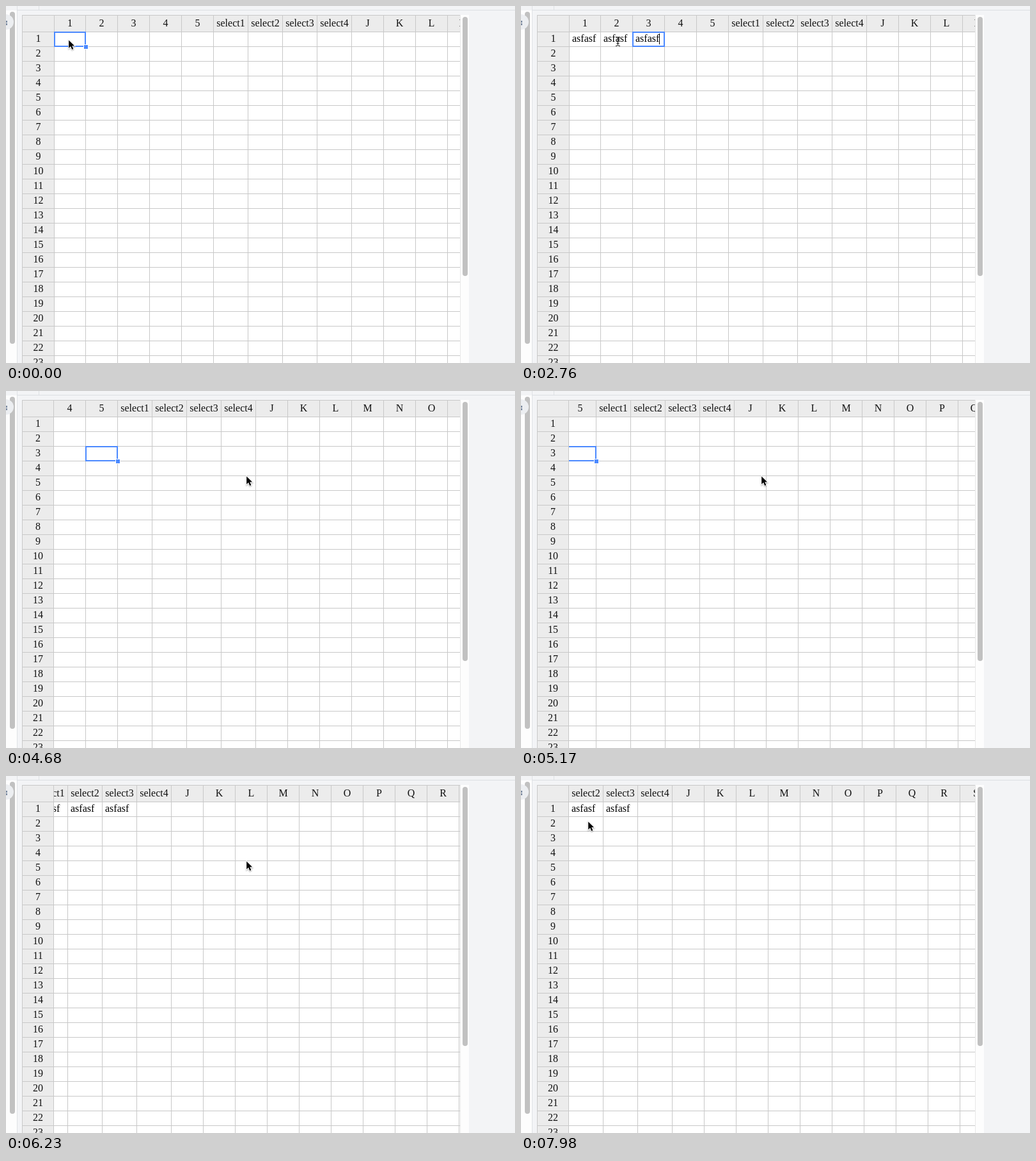
Write an HTML page with a canvas that moves like this. It is 796x558 px and loops after 8 s.

```html
<!DOCTYPE html>
<html lang="en">
<head>
<meta charset="utf-8">
<title>Spreadsheet</title>
<style>
  html, body { margin: 0; width: 100%; height: 100%; overflow: hidden; }
  canvas { display: block; }
</style>
</head>
<body>
<canvas id="stage" width="796" height="558"></canvas>
<script>
const ctx = document.getElementById('stage').getContext('2d');
const LOOP = 8000, WIDTH = 796, HEIGHT = 558;
const LEFT = 25, TOP = 14, HEAD_BOTTOM = 40, HEAD_RIGHT = 74, RIGHT = 710, ROW = 23;
const LINE = '#c8c8c8', HEAD = '#ececec', BLUE = '#4b89ff', PAGE = '#f3f4f6';
const TRACK = '#fdfdfd', THUMB = '#c1c1c1';
const WORD = 'asfasf', CARET_OFF = 2880;

const labels = [...'12345', 'select1', 'select2', 'select3', 'select4', ...'JKLMNOPQRSTU'];
let edge = HEAD_RIGHT + 1;
const columns = labels.map((label, i) => {
  const left = edge;
  edge += label.length > 1 ? 54 : i ? 50 : 49;
  return { label, left, right: edge };
});

const smooth = p => p * p * p * (10 - 15 * p + 6 * p * p);
const lateRush = p => p ** 4.4;

// Each move advances in `steps` jumps, one per `every` ms, to the given values.
const moves = [
  { start: 2760, steps: 1, every: 60, to: { x: 150 } },
  { start: 2820, steps: 2, every: 60, to: { x: 312, y: 94 } },
  { start: 3360, steps: 3, every: 60, to: { x: 376, y: 132 } },
  { start: 3950, steps: 13, every: 61, to: { scroll: 150 } },
  { start: 4830, steps: 14, every: 58, to: { scroll: 264 } },
  { start: 5650, steps: 12, every: 65, to: { scroll: 304 }, ease: lateRush },
  { start: 6850, steps: 7, every: 60, to: { x: 58, y: 46 } },
  { start: 7275, steps: 7, every: 60, to: { x: 195, y: 42 } },
  { start: 7690, steps: 6, every: 58, to: { x: 105, y: 70 } },
];

const edits = [
  { column: 0, start: 240, pace: 80, commit: 870 },
  { column: 1, start: 1170, pace: 70, commit: 1760 },
  { column: 2, start: 2060, pace: 70, commit: 3120 },
];

function stateAt(t) {
  const state = { x: 98, y: 52, scroll: 0 };
  for (const { start, steps, every, to, ease = smooth } of moves) {
    if (t < start) break;
    const step = 1 + Math.floor((t - start + 12) / every);
    const progress = ease(Math.min(1, step / steps));
    for (const key in to) state[key] = Math.round(state[key] + (to[key] - state[key]) * progress);
  }
  return state;
}

function rect(x, y, w, h, color) {
  ctx.fillStyle = color;
  ctx.fillRect(x, y, w, h);
}

function pill(x, y, w, h, color) {
  ctx.fillStyle = color;
  ctx.beginPath();
  ctx.roundRect(x, y, w, h, w / 2);
  ctx.fill();
}

function text(value, x, baseline, align = 'center', color = '#111') {
  ctx.textAlign = align;
  ctx.fillStyle = color;
  ctx.fillText(value, x, baseline);
}

function clip(x) {
  ctx.beginPath();
  ctx.rect(x, TOP, RIGHT - x, HEIGHT);
  ctx.clip();
}

function drawPage() {
  rect(0, 0, WIDTH, HEIGHT, PAGE);
  rect(0, 7, 17, HEIGHT, TRACK);
  rect(17, 0, 1, HEIGHT, '#dfe1e5');
  rect(18, 6, WIDTH, 1, '#dcdfe3');
  rect(51, 0, 1, 6, '#dfe1e5');
  pill(6, 9, 8, 519, THUMB);
  pill(-12, 13, 24, 24, '#eceef1');
  rect(0, 23, 2, 3, '#7d8ca3');
  rect(0, 27, 2, 3, '#7d8ca3');
  rect(RIGHT, TOP, 14, HEIGHT, TRACK);
  rect(RIGHT, TOP, 1, HEIGHT, '#e8e8e8');
  pill(714, 17, 8, 405, THUMB);
}

function drawGrid(scroll) {
  const headRight = Math.max(HEAD_RIGHT, columns[0].left - scroll);
  rect(LEFT, TOP, RIGHT - LEFT, HEIGHT, '#fff');
  rect(LEFT, TOP, RIGHT - LEFT, HEAD_BOTTOM - TOP, HEAD);
  rect(LEFT, TOP, headRight - LEFT, HEIGHT, HEAD);
  rect(LEFT, TOP, RIGHT - LEFT, 1, LINE);
  rect(LEFT, TOP, 1, HEIGHT, LINE);
  rect(headRight, TOP, 1, HEIGHT, LINE);
  for (let row = 0, y = HEAD_BOTTOM; y < HEIGHT; row++, y += ROW) {
    rect(LEFT, y, RIGHT - LEFT, 1, LINE);
    text(row + 1, (LEFT + headRight + 1) / 2, y + 16);
  }
}

function drawColumns(scroll) {
  for (const { label, left, right } of columns) {
    rect(right - scroll, TOP, 1, HEIGHT, LINE);
    text(label, (left + right + 1) / 2 - scroll, 32);
  }
}

function drawWord(column, value, scroll) {
  const x = columns[column].left + 5 - scroll;
  text(value, x, 56, 'left', '#000');
  return x + ctx.measureText(value).width;
}

function drawSelection(column, row, scroll, editing) {
  const x = columns[column].left - scroll, y = HEAD_BOTTOM + row * ROW;
  const endX = columns[column].right + 1 - scroll, endY = y + ROW + 1;
  ctx.strokeStyle = BLUE;
  ctx.lineWidth = 2;
  ctx.strokeRect(x + 1, y + 1, endX - x - 2, endY - y - 2);
  if (editing) return;
  rect(endX - 4, endY - 4, 8, 8, '#fff');
  rect(endX - 3, endY - 3, 6, 6, BLUE);
}

function drawCells(t, scroll) {
  const edit = edits.find(e => t < e.commit);
  const editing = edit && t >= edit.start;

  // Once the first five columns leave the view, their values land on the next ones.
  const offset = scroll >= 250 ? 5 : 0;
  for (const e of edits) {
    if (t >= e.commit) drawWord(e.column + offset, WORD, scroll);
  }
  drawSelection(edit ? edit.column : 4, edit ? 0 : 2, scroll, editing);
  if (editing) {
    const typed = WORD.slice(0, 1 + Math.floor((t - edit.start) / edit.pace));
    const caret = drawWord(edit.column, typed, scroll);
    if (t < CARET_OFF) rect(Math.floor(caret), 43, 1, 17, '#000');
  }
}

function drawArrow(x, y) {
  const shape = new Path2D('M.5 .5V14.6L3.8 11.5L6.2 17L8.6 16L6.2 10.6H10.6Z');
  ctx.save();
  ctx.translate(x - 0.2, y + 1);
  ctx.scale(0.88, 0.88);
  ctx.shadowColor = 'rgba(0,0,0,.35)';
  ctx.shadowBlur = 2;
  ctx.shadowOffsetY = 1;
  ctx.strokeStyle = '#fff';
  ctx.lineWidth = 2;
  ctx.stroke(shape);
  ctx.shadowColor = 'transparent';
  ctx.fillStyle = '#000';
  ctx.fill(shape);
  ctx.restore();
}

function drawBeam(x, y) {
  const shape = new Path2D('M-3.5 -7Q0 -7 0 -5Q0 -7 3.5 -7M0 -5V5M-3.5 7Q0 7 0 5Q0 7 3.5 7M-2 3H2');
  ctx.save();
  ctx.translate(x + 1.5, y + 3.5);
  ctx.strokeStyle = '#111';
  ctx.lineWidth = 1;
  ctx.stroke(shape);
  ctx.restore();
}

function draw(t) {
  const { x, y, scroll } = stateAt(t);
  ctx.font = '16px "Liberation Serif", Times, serif';
  drawPage();

  ctx.save();
  clip(LEFT);
  drawGrid(scroll);
  clip(HEAD_RIGHT + 1);
  drawColumns(scroll);
  drawCells(t, scroll);
  ctx.restore();

  const drawPointer = t >= 240 && t < 2820 ? drawBeam : drawArrow;
  drawPointer(x, y);
}

function frame() {
  draw(performance.now() % LOOP);
  requestAnimationFrame(frame);
}
frame();
</script>
</body>
</html>
```
